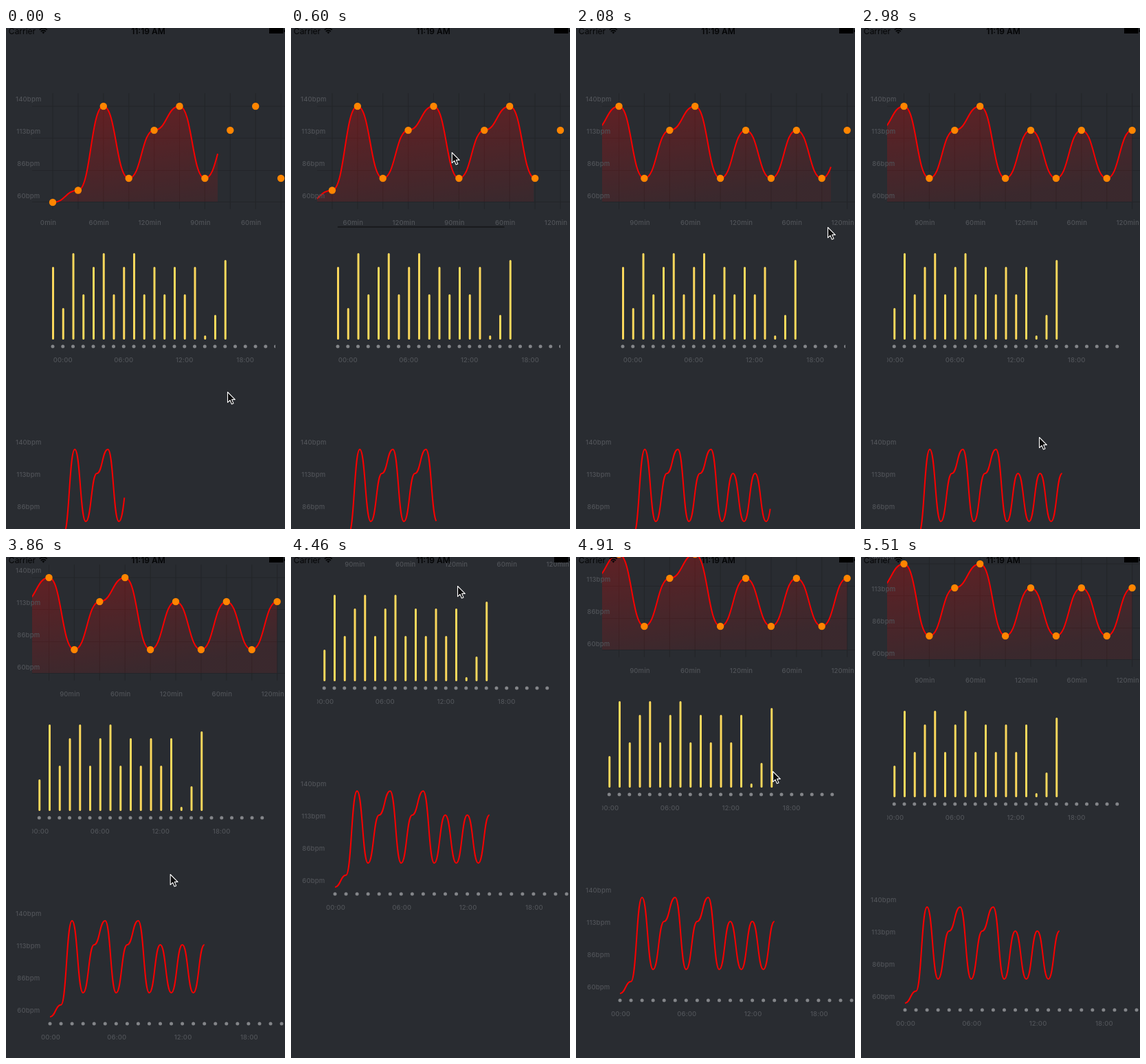
An HTML page that plays this animation: 406x730 px, repeating every 5.66 s.

```html
<!DOCTYPE html>
<html lang="en">
<head>
<meta charset="utf-8">
<title>Heart rate charts</title>
<style>
  html, body { margin: 0; width: 100%; height: 100%; overflow: hidden; background: #292c31; }
  svg { display: block; }
  text { font: 500 9.5px Inter, "Liberation Sans", sans-serif; letter-spacing: .15px; fill: #505358; text-anchor: middle; }
  .status text { font-size: 12px; letter-spacing: 0; fill: #040506; }
  .line { fill: none; stroke: #f90000; stroke-width: 2; }
  .bars { fill: none; stroke: #fbd85c; stroke-width: 3; stroke-linecap: round; }
  .grid { fill: none; stroke: #232529; stroke-width: 1; }
  .dots { fill: #838589; }
  .points { fill: #ff8500; }
</style>
</head>
<body>
<svg id="stage" width="406" height="730" viewBox="0 0 406 730"></svg>
<script>
const LOOP = 5660;
const LEVELS = [254, 236.5, 114, 219, 149, 114, 219, 149, 114, 219, 149, 219, 149, 219, 149];
const BAR_TOPS = [348, 408, 328, 388, 348, 328, 388, 348, 328, 388, 348, 388, 348, 388, 348, 448, 418, 338];
const MINUTES = [0, 60, 120, 90, 60, 120, 60, 120];
const HOURS = ['00:00', '06:00', '12:00', '18:00'];
const LEFT = 68, WIDE = 36.9, NARROW = 16.05, BAR_GAP = 14.75;

// Markup helpers
const each = (n, fn) => Array.from({ length: n }, (_, i) => fn(i)).join('');
const label = (x, y, s) => `<text x="${x}" y="${y + 3.4}">${s}</text>`;
const dot = (x, y, r) => `<circle cx="${x}" cy="${y}" r="${r}"/>`;
const bpm = dy => [140, 113, 86, 60].map((v, i) => label(32.8, 104 + 46.7 * i + dy, v + 'bpm')).join('');

// Smooth curve that is level at every point
function curve(gap, dy) {
  let d = `M${LEFT} ${LEVELS[0] + dy}`;
  for (let i = 1; i < LEVELS.length; i++) {
    const x = LEFT + gap * i, mid = x - gap / 2;
    d += `C${mid} ${LEVELS[i - 1] + dy} ${mid} ${LEVELS[i] + dy} ${x} ${LEVELS[i] + dy}`;
  }
  return d;
}

const main = curve(WIDE, 0);
const mainEnd = LEFT + WIDE * 14;
const stage = document.getElementById('stage');

stage.innerHTML = `
<defs>
  <linearGradient id="shade" gradientUnits="userSpaceOnUse" x1="300" y1="100" x2="324" y2="258">
    <stop offset="0" stop-color="#f00" stop-opacity=".26"/>
    <stop offset="1" stop-color="#f00" stop-opacity=".08"/>
  </linearGradient>
  <clipPath id="view"><rect x="38" y="80" width="368" height="900"/></clipPath>
  <clipPath id="barView"><rect x="38" y="300" width="354" height="220"/></clipPath>
  <clipPath id="drawn"><rect id="reveal" x="0" y="90" width="300" height="180"/></clipPath>
</defs>
<g id="page">
  <g clip-path="url(#view)">
    <path class="grid" d="${[114, 160.5, 207.5, 253.5].map(y => `M38 ${y}H406`).join('')}"/>
    <g id="pulse">
      <path class="grid" d="${each(15, i => `M${LEFT + WIDE * i} 95V264`)}"/>
      <path d="${main}V253H${LEFT}Z" fill="url(#shade)" clip-path="url(#drawn)"/>
      <path id="mainLine" class="line" pathLength="1" d="${main}"/>
      <g class="points">${each(15, i => dot(LEFT + WIDE * i, LEVELS[i], 5.2))}</g>
      ${MINUTES.map((m, i) => label(61.5 + WIDE * 2 * i, 284, m + 'min')).join('')}
    </g>
    <rect id="thumb" y="288.7" width="243" height="2.4" rx="1.2" fill="#191b1e"/>
  </g>
  ${bpm(0)}
  <g clip-path="url(#barView)"><g id="steps">
    <path class="bars" d="${BAR_TOPS.map((y, i) => `M${LEFT + .5 + BAR_GAP * i} 452.5V${y + 1.5}`).join('')}"/>
    <g class="dots">${each(24, i => dot(LEFT + BAR_GAP * i, 464, 2.5))}</g>
    ${HOURS.map((h, i) => label(LEFT + BAR_GAP * (1 + 6 * i), 484, h)).join('')}
  </g></g>
  ${bpm(500)}
  <g clip-path="url(#view)"><g id="day">
    <path id="dayLine" class="line" pathLength="1" d="${curve(NARROW, 500)}"/>
    <g class="dots">${each(24, i => dot(LEFT + NARROW * i, 764, 2.5))}</g>
    ${HOURS.map((h, i) => label(LEFT + 1 + NARROW * 6 * i, 784, h)).join('')}
  </g></g>
</g>
<g class="status">
  <text x="23.5" y="9" style="font-weight:400">Carrier</text>
  <text x="207" y="9" style="font-weight:600">11:19 AM</text>
  <g fill="none" stroke="#040506" stroke-width="1.7">
    <path d="M48.8 2.7Q54.3 -2 59.8 2.7M50.8 5Q54.3 2 57.8 5"/>
    <path d="M52.3 6.3Q54.3 4.8 56.3 6.3L54.3 8.6Z" fill="#040506" stroke="none"/>
  </g>
  <path d="M383 0H403.5V8H383ZM404.5 2.5H406V6H404.5Z" fill="#000"/>
</g>
<path id="cursor" d="M.5 .5V15.6L4 12.4 6.4 18 9 16.9 6.6 11.4H11.3Z" fill="#0c0c0d" stroke="#fff" stroke-width="1.1" stroke-linejoin="round"/>`;

const part = {};
stage.querySelectorAll('[id]').forEach(el => part[el.id] = el);
const lineLength = part.mainLine.getTotalLength();

// Motion tracks: step number, then values
const POINTER = [
  [0, 322, 530], [1, 315, 420], [3, 285, 182], [7, 80, 178], [8, 80, 176], [10, 120, 200],
  [14, 366, 290], [16, 350, 400], [18, 270, 420], [20, 259, 596], [21, 262, 640], [22, 245, 640],
  [24, 238, 546], [30, 242, 42], [33, 286, 312], [35, 300, 697], [36, 305, 760]
];
const PULSE = [[3, 0], [7, 180], [8, 186], [9, 190]];
const STEPS = [[16, 0], [18, 34.5]];
const DAY = [[21, 0], [22, 4]];

function track(keys, k, n = 1) {
  if (k <= keys[0][0]) return keys[0][n];
  for (let i = 1; i < keys.length; i++) {
    const a = keys[i - 1], b = keys[i];
    if (k <= b[0]) return a[n] + (b[n] - a[n]) * (k - a[0]) / (b[0] - a[0]);
  }
  return keys[keys.length - 1][n];
}

// The picture advances in steps of 150 ms, four of them 10 ms shorter
const startOf = k => 150 * k - 10 * [4, 8, 20, 28].filter(s => k > s).length;
function stepAt(t) {
  let k = 37;
  while (startOf(k) > t) k--;
  return k;
}

// Ease-in-out, cubic-bezier(.42, 0, .58, 1)
function ease(x) {
  if (x >= 1) return 1;
  let lo = 0, hi = 1;
  for (let i = 0; i < 24; i++) {
    const s = (lo + hi) / 2, r = 1 - s;
    if (1.26 * s * r * r + 1.74 * s * s * r + s ** 3 < x) lo = s; else hi = s;
  }
  return lo * lo * (3 - 2 * lo);
}

// Drag with rubber band past the end, then a damped spring back
const END = 104, HEIGHT = 736;
function pageScroll(k) {
  if (k < 24) return 0;
  const drag = 546 - track(POINTER, Math.min(k, 30), 2);
  if (drag <= END) return drag;
  const over = HEIGHT * (1 - 1 / (1 + .55 * (drag - END) / HEIGHT));
  const u = 9.18 * Math.max(0, startOf(k) - startOf(30)) / 1000;
  return END + over * (1 + u) * Math.exp(-u);
}

const move = (el, x, y) => el.setAttribute('transform', `translate(${x} ${y})`);

function draw(k) {
  const p = ease(.49 + startOf(k) / 5900);
  const dash = p >= 1 ? 'none' : `${p} 2`;
  part.mainLine.style.strokeDasharray = dash;
  part.dayLine.style.strokeDasharray = dash;
  const tip = p >= 1 ? mainEnd : part.mainLine.getPointAtLength(p * lineLength).x;
  part.reveal.setAttribute('width', tip);

  const shift = track(PULSE, k);
  move(part.pulse, -shift, 0);
  part.thumb.setAttribute('x', 38 + shift * 368 / 558);
  part.thumb.setAttribute('opacity', k > 3 && k < 10 ? 1 : 0);
  move(part.steps, -track(STEPS, k), 0);
  move(part.day, -track(DAY, k), 0);
  move(part.page, 0, -Math.round(pageScroll(k)));
  move(part.cursor, track(POINTER, k, 1), track(POINTER, k, 2));
}

const begin = performance.now();
let shown = -1;
function tick() {
  const k = stepAt((performance.now() - begin) % LOOP);
  if (k !== shown) draw(shown = k);
  requestAnimationFrame(tick);
}
tick();
</script>
</body>
</html>
```
